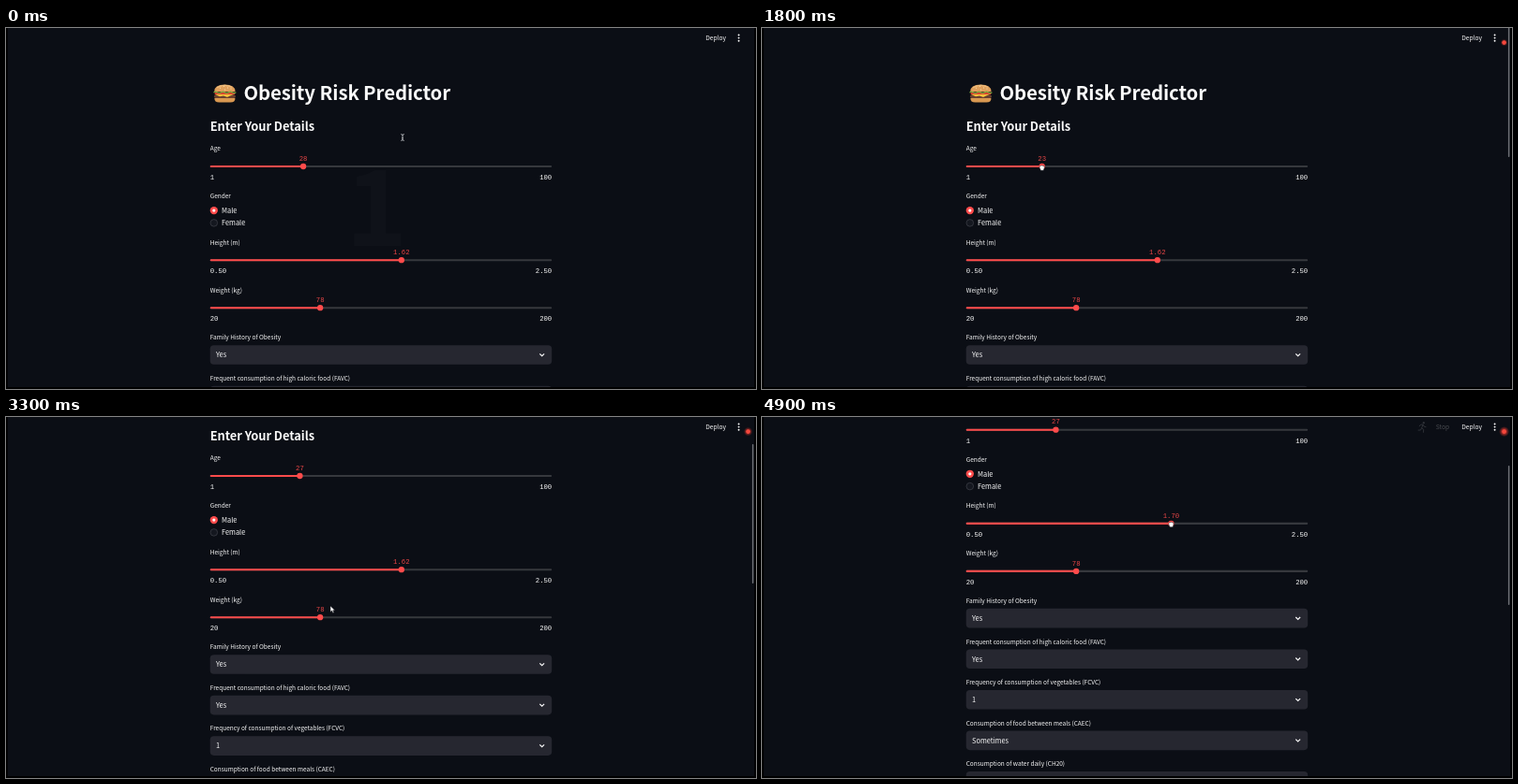
Animation of 800 by 386 pixels, one loop 5000 ms. Source, as an HTML page:

```html
<!DOCTYPE html>
<html lang="en">
<head>
<meta charset="utf-8">
<title>Obesity Risk Predictor</title>
<style>
  html, body { margin: 0; width: 100%; height: 100%; overflow: hidden; background: #0b0e15; }
  svg { display: block; width: 800px; height: 386px; }
  text { fill: #fafafa; font-family: "Noto Sans CJK JP", "Noto Sans CJK SC", "Noto Sans CJK", "Noto Sans", sans-serif; white-space: pre; }
  .title { font-size: 20.4px; font-weight: 700; letter-spacing: -.1px; }
  .heading { font-size: 12.85px; font-weight: 600; letter-spacing: -.05px; }
  .label { font-size: 6.5px; }
  .option { font-size: 7.42px; }
  .menu { font-size: 6.7px; }
  .mono { font: 7.25px "Liberation Mono", "DejaVu Sans Mono", monospace; }
  .value { fill: #ff4b4b; fill-opacity: .9; text-anchor: middle; }
  .end { text-anchor: end; }
</style>
</head>
<body>
<svg viewBox="0 0 800 386" id="stage"></svg>
<script>
const LOOP = 5000, STEP = 100;
const LEFT = 217.7, WIDTH = 364.5, RIGHT = LEFT + WIDTH;
const RED = '#ff4b4b';

const text = (x, y, kind, content) => `<text x="${x}" y="${y}" class="${kind}">${content}</text>`;
const bar = (y, width, color, id = '') =>
  `<rect ${id} x="${LEFT}" y="${y - 1.05}" width="${width}" height="2.1" rx="1" fill="${color}"/>`;

function slider(id, y, label, min, max, digits) {
  return text(LEFT, y - 16.7, 'label', label) +
    bar(y, WIDTH, '#36383d') + bar(y, 0, RED, `id="${id}-fill"`) +
    `<circle id="${id}-thumb" cy="${y}" r="3.15" fill="${RED}"/>` +
    `<text id="${id}-value" y="${y - 6.3}" class="mono value"></text>` +
    text(LEFT, y + 14, 'mono', min.toFixed(digits)) +
    text(RIGHT, y + 14, 'mono end', max.toFixed(digits));
}

function radio(y, label, checked) {
  const ring = checked
    ? `<circle cx="221.8" cy="${y}" r="4.15" fill="${RED}"/><circle cx="221.8" cy="${y}" r="1.6" fill="#fff"/>`
    : `<circle cx="221.8" cy="${y}" r="3.8" fill="#14171f" stroke="#41434b" stroke-width=".7"/>`;
  return ring + text(230, y + 2.8, 'option', label);
}

function select(row, label, value) {
  const y = 349.5 + row * 43.53;
  return text(LEFT, y - 16.2, 'label', label) +
    `<rect x="${LEFT}" y="${y - 10.35}" width="${WIDTH}" height="20.7" rx="4.1" fill="#262730"/>` +
    text(224, y + 2.8, 'option', value) +
    `<path d="M569.3 ${y - 1.2}l2.4 2.4 2.4-2.4" fill="none" stroke="#fafafa" stroke-width="1.2"/>`;
}

const burger = `
  <path d="M222.2 68.2Q222 60.6 233.3 60.6T244.6 68.2Z" fill="#e0a05c"/>
  <path d="M225 63.8Q233 59.4 241 63.2" fill="none" stroke="#f0bd7c" stroke-width="1.2"/>
  <path d="M228 64.2h1M232 62.4h1M236 64h1M239.5 65h1M233 66h1" stroke="#fbe6bd" stroke-width=".8"/>
  <rect x="222.6" y="69" width="21.6" height="2.2" fill="#d9452f"/>
  <rect x="221.9" y="71.4" width="23" height="3.6" rx="1.7" fill="#68402f"/>
  <path d="M223 71h20l-4 1.6-3 1.5-4-1.7-4 .8z" fill="#f6c13a"/>
  <path d="M221.4 68.2q2-1.4 4 0t4 0 4 0 4 0 4 0 4 0v1.2q-2 1.4-4 0t-4 0-4 0-4 0-4 0-4 0z" fill="#7fae3f"/>
  <path d="M222.4 75H244.4Q244.6 79.6 239.5 79.6H227.3Q222.2 79.6 222.4 75Z" fill="#d99851"/>`;

const cursors = `
  <g id="cursor">
    <path id="ibeam" d="M-1.7-3.4Q0-3.4 0-2.3Q0-3.4 1.7-3.4M0-2.6V2.6M-1.7 3.4Q0 3.4 0 2.3Q0 3.4 1.7 3.4M-.8.8H.8"
      fill="none" stroke="#d5d7da" stroke-width=".8"/>
    <path id="arrow" d="M0 0V6.6L1.6 5.2 2.7 7.7 3.9 7.2 2.8 4.8H4.9Z" fill="#fff" stroke="#15171c" stroke-width=".5"/>
    <path id="grab" d="M-3-.6Q-2.8-1.6-1.7-.9L-2.1-3Q-1.3-4.2-.8-2.9Q-.3-4.7.5-3.1Q1.3-4.2 1.7-2.5Q2.9-3 2.8-1.2L2.4 1.8 1.6 3.8H-1.2L-2.2 1.7Z"
      fill="#fff" stroke="#17191e" stroke-width=".5"/>
    <path id="grabbing" d="M-2.6.5Q-2.8-.8-1.8-1Q-1.4-2-.6-1.3Q.1-2.1.8-1.3Q1.6-1.8 1.9-.9Q2.9-.9 2.6.8L1.7 3.7H-1.3Z"
      fill="#fff" stroke="#17191e" stroke-width=".5"/>
  </g>`;

document.getElementById('stage').innerHTML = `
  <defs><radialGradient id="halo">
    <stop offset=".25" stop-color="#f03a30"/><stop offset="1" stop-color="#f03a30" stop-opacity="0"/>
  </radialGradient></defs>
  <rect width="800" height="386" fill="#0b0e15"/>
  <text id="countdown" x="395" y="233" font-size="112" font-weight="700" text-anchor="middle" fill-opacity=".018">1</text>
  <g id="page">
    ${burger}
    ${text(253.4, 76.6, 'title', 'Obesity Risk Predictor')}
    ${text(LEFT, 110.4, 'heading', 'Enter Your Details')}
    ${slider('age', 148, 'Age', 1, 100, 0)}
    ${text(LEFT, 182.3, 'label', 'Gender')}
    ${radio(195.1, 'Male', true)}
    ${radio(208.4, 'Female', false)}
    ${slider('height', 248.2, 'Height (m)', .5, 2.5, 2)}
    ${slider('weight', 299.2, 'Weight (kg)', 20, 200, 0)}
    ${select(0, 'Family History of Obesity', 'Yes')}
    ${select(1, 'Frequent consumption of high caloric food (FAVC)', 'Yes')}
    ${select(2, 'Frequency of consumption of vegetables (FCVC)', '1')}
    ${select(3, 'Consumption of food between meals (CAEC)', 'Sometimes')}
    ${select(4, 'Consumption of water daily (CH20)', '')}
  </g>
  <g id="running">
    <g fill="none" stroke="#a3a5a9" stroke-width=".9" stroke-linecap="round" stroke-linejoin="round">
      <circle cx="705.7" cy="6.2" r=".7" fill="#a3a5a9"/>
      <path d="M701.2 9.8l1.6-1.8 2.4.2 1 2 1.8.4M704.9 8.4l-1.2 3.4 2 1.6-.2 2.9M703.5 12l-1 2-2.4.1"/>
    </g>
    ${text(718.8, 13, 'menu', 'Stop')}
  </g>
  ${text(746.2, 13, 'menu', 'Deploy')}
  <g fill="#fafafa"><circle cx="781.6" cy="7.5" r=".95"/><circle cx="781.6" cy="10.6" r=".95"/><circle cx="781.6" cy="13.7" r=".95"/></g>
  <rect id="scrollbar" x="795.9" width="1.5" height="149" rx=".7" fill="#6d6f74"/>
  <g id="recorder">
    <circle id="glow" cx="791.6" cy="15.6" fill="url(#halo)"/>
    <circle cx="791.6" cy="15.6" r="2.3" fill="#f5483d"/>
  </g>
  ${cursors}
  <path d="M0 0H1.8V386H0ZM798.2 0H800V386H798.2ZM0 384H800V386H0Z" fill="#000"/>`;

const el = {};
document.querySelectorAll('[id]').forEach(node => el[node.id] = node);

// Each track is a list of [time, value] keys, eased between neighbours.
const tracks = {
  age: [[1100, 28], [1800, 23], [1900, 23], [2600, 27]],
  height: [[4200, 1.62], [4800, 1.7]],
  weight: [[0, 78]],
  scroll: [[3200, 0], [3300, 85], [3400, 85], [3500, 134.3]],
  thumb: [[3100, 0], [3200, 6], [3300, 40], [3400, 40], [3500, 63]],
  x: [[100, 423], [800, 317.8], [1100, 317.8], [1800, 298.6], [1900, 298.6], [2600, 313.3], [2800, 313.3],
      [3200, 343], [3400, 349], [3500, 356], [3600, 356], [4100, 421.8], [4200, 421.8], [4800, 436.4]],
  y: [[100, 117], [800, 147.3], [1100, 147.3], [1300, 148.6], [2800, 148.6],
      [3200, 203.8], [3400, 200], [3500, 195], [3600, 195], [4100, 114]],
  running: [[2400, 0], [2600, 1], [2800, 1], [2900, 0], [4800, 0], [4900, .25]]
};
const pointers = [[0, 'ibeam'], [300, 'arrow'], [800, 'grab'], [1100, 'grabbing'], [2800, 'arrow'], [4100, 'grab'], [4200, 'grabbing']];

function at(name, t) {
  const keys = tracks[name];
  const next = keys.findIndex(key => key[0] > t);
  if (next === 0) return keys[0][1];
  if (next < 0) return keys[keys.length - 1][1];
  const [t0, a] = keys[next - 1], [t1, b] = keys[next];
  const p = (t - t0) / (t1 - t0);
  return a + (b - a) * p * p * (3 - 2 * p);
}

function setSlider(id, value, min, max, digits) {
  const shown = Number(value.toFixed(digits));
  const length = (shown - min) / (max - min) * WIDTH;
  el[id + '-fill'].setAttribute('width', length);
  el[id + '-thumb'].setAttribute('cx', LEFT + length);
  el[id + '-value'].setAttribute('x', LEFT + length);
  el[id + '-value'].textContent = shown.toFixed(digits);
}

function draw(t) {
  setSlider('age', at('age', t), 1, 100, 0);
  setSlider('height', at('height', t), .5, 2.5, 2);
  setSlider('weight', at('weight', t), 20, 200, 0);
  el.page.setAttribute('transform', `translate(0 ${-at('scroll', t)})`);
  el.scrollbar.setAttribute('y', at('thumb', t) - 11);
  el.running.setAttribute('opacity', at('running', t));

  const started = t >= STEP;
  el.countdown.style.display = started ? 'none' : '';
  el.scrollbar.style.display = el.recorder.style.display = started ? '' : 'none';
  const pulse = .65 + .35 * Math.cos(t / 1200 * 2 * Math.PI);
  el.glow.setAttribute('r', 3.2 + 2.4 * pulse);
  el.glow.setAttribute('opacity', .4 + .5 * pulse);

  const pointer = pointers.filter(([start]) => start <= t).pop()[1];
  for (const shape of el.cursor.children) shape.style.display = shape.id === pointer ? '' : 'none';
  el.cursor.setAttribute('transform', `translate(${at('x', t)} ${at('y', t)})`);
}

function tick() {
  draw(Math.floor(performance.now() % LOOP / STEP) * STEP);
  requestAnimationFrame(tick);
}
tick();
</script>
</body>
</html>
```
